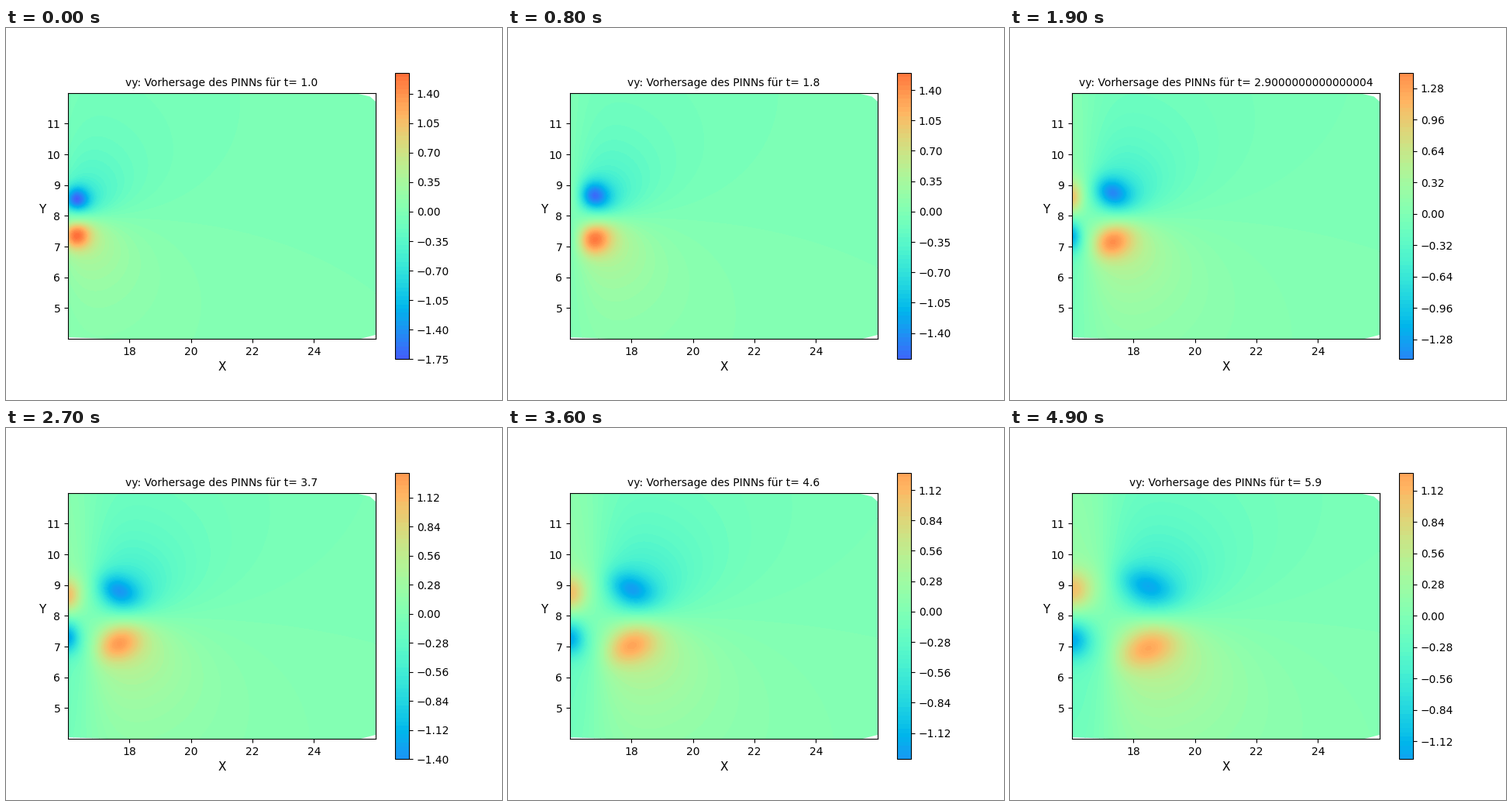
Recreate the animation shown at these times as a matplotlib script. Size 640 by 480 pixels, loop 5 s.

```python
import numpy as np
import matplotlib.pyplot as plt
from matplotlib.animation import FuncAnimation
from matplotlib.path import Path

FRAMES, INTERVAL = 50, 100
COLOR_LIMIT = 2.3
MID_Y = 7.95

plt.rcParams["font.family"] = "DejaVu Sans"
fig = plt.figure(figsize=(6.4, 4.8), dpi=100)
X, Y = np.meshgrid(np.linspace(16, 26, 181), np.linspace(4, 12, 145))

# Convex outline of the sampled region: the corners stay empty.
HULL = Path([(16, 4.05), (17.35, 4), (25.5, 4), (26, 4.13), (26, 11.72),
             (25.82, 11.88), (25.3, 12), (16.3, 12), (16, 11.97), (16, 4.05)])


def value_range(t):
    times = [1.0, 1.6, 2.9, 3.7, 4.6, 5.9]
    low = np.interp(t, times, [-1.735, -1.704, -1.465, -1.375, -1.325, -1.245])
    high = np.interp(t, times, [1.64, 1.605, 1.42, 1.335, 1.265, 1.25])
    return low, high


def bump(distance, size):
    return np.exp(-(distance / size) ** 2)


def velocity(t):
    """Mirrored pair of drifting lobes with a wide wake and inflow lobes."""
    low, high = value_range(t)
    age = t - 1
    s = Y - MID_Y

    lobe_x = 16.22 + 0.68 * age**0.75
    lobe_s = 0.58 + 0.16 * age**0.7
    zero_x = 15.55 + 0.55 * age**0.62
    tilt = 0.22 * (1 - np.exp(-age**2 / 4))

    def wake(dx, offset):
        spread = (0.8 + 0.09 * age) ** 2 + 0.9 * dx**2 + 1.2 * offset**2
        return (1.16 + 0.32 * age) * offset / spread**1.3

    dx = X - lobe_x + 0.12 * np.tanh(age)
    core = bump(dx, 0.45 + 0.1 * age)
    core *= bump(np.abs(s) - lobe_s + tilt * dx, 0.43 + 0.06 * age**0.5)
    core *= np.tanh(s / 0.3) * (-low - wake(0, lobe_s))
    field = -core * np.tanh((X - zero_x) / 0.45)
    field -= wake(X - lobe_x - 0.1, s) * np.tanh((X - zero_x) / 0.8)
    field -= 0.008
    field *= np.where(field < 0, low / field.min(), high / field.max())

    inflow = bump(X - 16, 0.1 + 0.11 * age) * (1 - np.exp(-(age / 1.5) ** 5))
    tall = 0.42 + 0.045 * age
    field += 0.92 * inflow * bump(Y - 8.45 - 0.08 * age, tall)
    field -= 1.08 * inflow * bump(Y - 7.42 + 0.04 * age, tall)
    return np.clip(field, low, high)


def draw(i):
    t = 1.0 + i * 0.1
    fig.clear()
    ax = fig.add_subplot()
    contours = ax.contourf(X, Y, velocity(t), levels=80, cmap="rainbow",
                           vmin=-COLOR_LIMIT, vmax=COLOR_LIMIT)
    ax.set_aspect("equal")
    ax.set(xlim=(16.0005, 25.9995), ylim=(4.0005, 11.9995))
    contours.set_clip_path(HULL, ax.transData)
    ax.set_title(f"vy: Vorhersage des PINNs für t= {t}", fontsize=10)
    ax.set_xlabel("X", fontsize=11)
    ax.set_ylabel("Y", fontsize=11, rotation=0)
    fig.colorbar(contours, ax=ax)
    return []


anim = FuncAnimation(fig, draw, frames=FRAMES, interval=INTERVAL,
                     init_func=lambda: [], repeat=True, repeat_delay=0)
plt.show()
```
